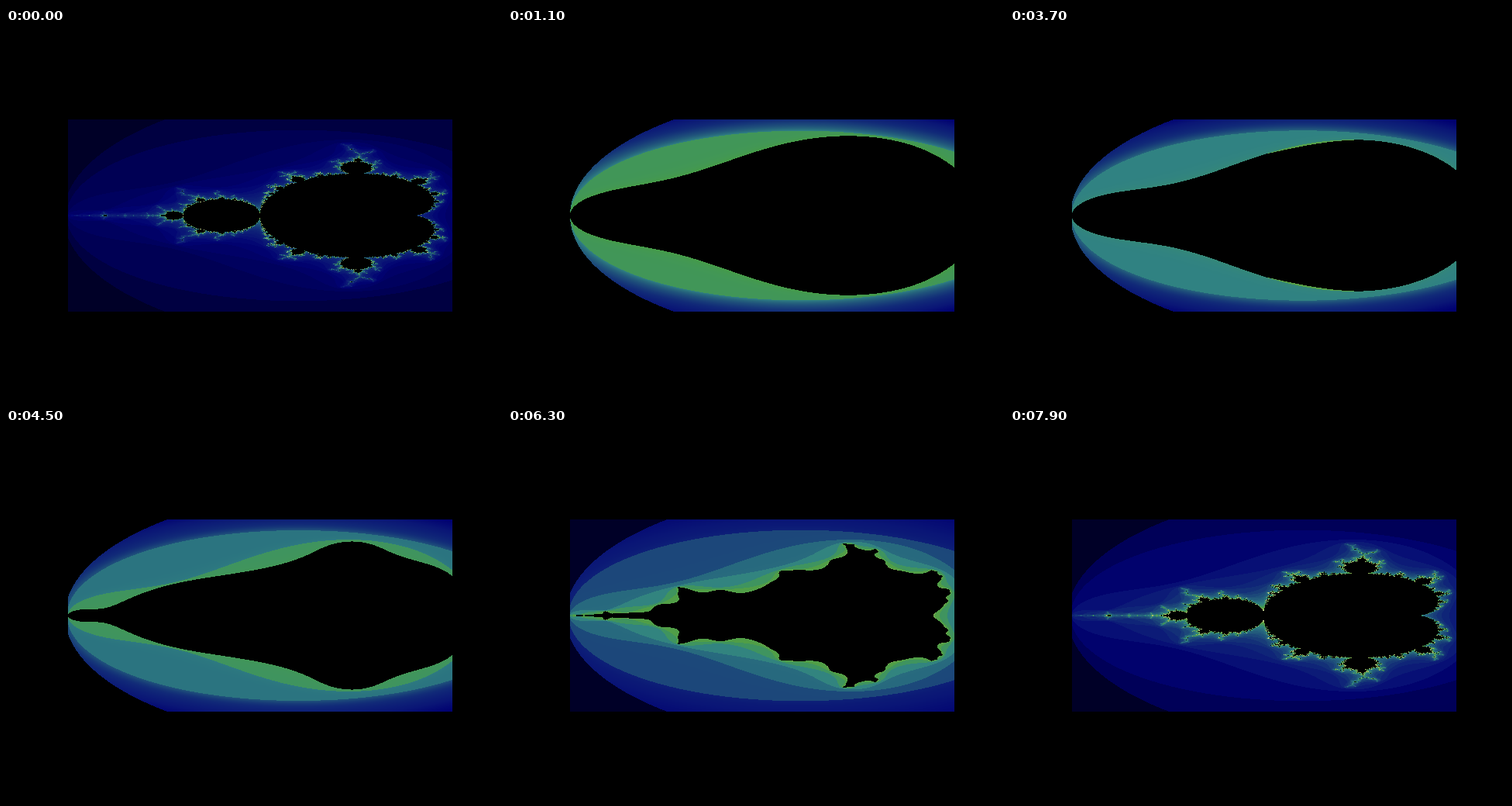
These frames come from a looping animation (640x480 px, 8000 ms). An HTML page with a canvas:

```html
<!DOCTYPE html>
<html lang="en">
<head>
<meta charset="utf-8">
<title>Escape-time set</title>
<style>
  html, body { margin: 0; width: 100%; height: 100%; overflow: hidden; background: #000; }
  canvas { display: block; width: 640px; height: 480px; }
</style>
</head>
<body>
<canvas id="stage" width="640" height="480"></canvas>
<script>
const LOOP = 8000, STEP = 100, COUNT = LOOP / STEP;
const W = 496, H = 248, LEFT = 80, TOP = 118;
const ctx = document.getElementById('stage').getContext('2d');
const image = ctx.createImageData(W, H);
const pixels = new Uint32Array(image.data.buffer);
const BLACK = 0xff000000;

// position, red, green, blue
const stops = [
  [0, 0, 0, 0], [.004, 0, 0, 40], [.012, 0, 0, 58], [.03, 0, 0, 84],
  [.07, 1, 2, 114], [.1, 10, 22, 118], [.15, 17, 42, 120], [.2, 27, 70, 122],
  [.25, 35, 92, 124], [.3, 41, 110, 127], [.36, 48, 130, 130], [.42, 60, 144, 106],
  [.5, 70, 156, 70], [.56, 104, 164, 74], [.65, 155, 175, 87], [1, 253, 250, 250]
];

// step, iterations, colour per level, fade away from a level's edge
const keys = [
  [1, 2.8, .28, 1.03],
  [21, 2.97, .233, .98],
  [37, 3.1, .2, .9],
  [53, 4.95, .155, .6],
  [72, 10, .085, .02],
  [79, 40, .035, .01],
  [80, 90, .017, .01]
];

const lerp = (a, b, u) => a + (b - a) * u;
const clamp = (x, a, b) => Math.min(b, Math.max(a, x));

function between(list, x) {
  let i = 0;
  while (i < list.length - 2 && x > list[i + 1][0]) i++;
  const a = list[i], b = list[i + 1];
  return [a, b, (x - a[0]) / (b[0] - a[0])];
}

const palette = new Uint32Array(1024).map((_, i) => {
  const [a, b, u] = between(stops, i / 1023);
  const [r, g, bl] = [1, 2, 3].map(k => Math.round(lerp(a[k], b[k], u)));
  return (255 << 24 | bl << 16 | g << 8 | r) >>> 0;
});

function settings(step) {
  const [a, b, u] = between(keys, step);
  const geo = k => a[k] * Math.pow(b[k] / a[k], u);
  return {
    depth: geo(1),
    scale: geo(2),
    fade: lerp(a[3], b[3], u),
    radius: 2 + .03 * clamp((step - 28) / 25, 0, 1),
    outside: step > 60 ? .004 : 0
  };
}

function shade(level, r, s) {
  if (level === 1) return s.outside;
  const d = Math.max(0, r - s.radius), soft = Math.min(1, s.fade);
  if (level === 2) {
    return s.scale * (Math.exp(-s.fade * d) + .4 * soft * Math.exp(-8 * d));
  }
  return s.scale * (Math.pow(level - 1, .85) + .15 * soft * Math.exp(-4 * d));
}

function colourAt(cx, cy, s) {
  const last = Math.ceil(s.depth), part = s.depth - last + 1;
  const limit = s.radius * s.radius;
  let x = cx, y = cy;
  for (let level = 1; ; level++) {
    const r2 = x * x + y * y;
    if (r2 > limit) {
      const v = shade(level, Math.sqrt(r2), s);
      return palette[Math.round(clamp(v, 0, 1) * 1023)];
    }
    if (level >= last) return BLACK;
    let nx = x * x - y * y + cx, ny = 2 * x * y + cy;
    // the deepest iteration is only partly taken
    if (level + 1 === last) {
      nx = lerp(x, nx, part);
      ny = lerp(y, ny, part);
    }
    x = nx;
    y = ny;
  }
}

function draw(step) {
  const s = settings(step || COUNT);
  for (let j = 0; j < H / 2; j++) {
    const cy = 1.5 - 3 * (j + .5) / H;
    const upper = j * W, lower = (H - 1 - j) * W;
    for (let i = 0; i < W; i++) {
      const cx = -2 + 2.5 * (i + .5) / W;
      pixels[upper + i] = pixels[lower + i] = colourAt(cx, cy, s);
    }
  }
  ctx.fillStyle = '#000';
  ctx.fillRect(0, 0, 640, 480);
  ctx.putImageData(image, LEFT, TOP);
}

const start = performance.now();
let shown = -1;

function tick() {
  const elapsed = Math.max(0, performance.now() - start);
  const step = Math.floor(elapsed % LOOP / STEP);
  if (step !== shown) {
    draw(step);
    shown = step;
  }
  requestAnimationFrame(tick);
}
tick();
</script>
</body>
</html>
```
